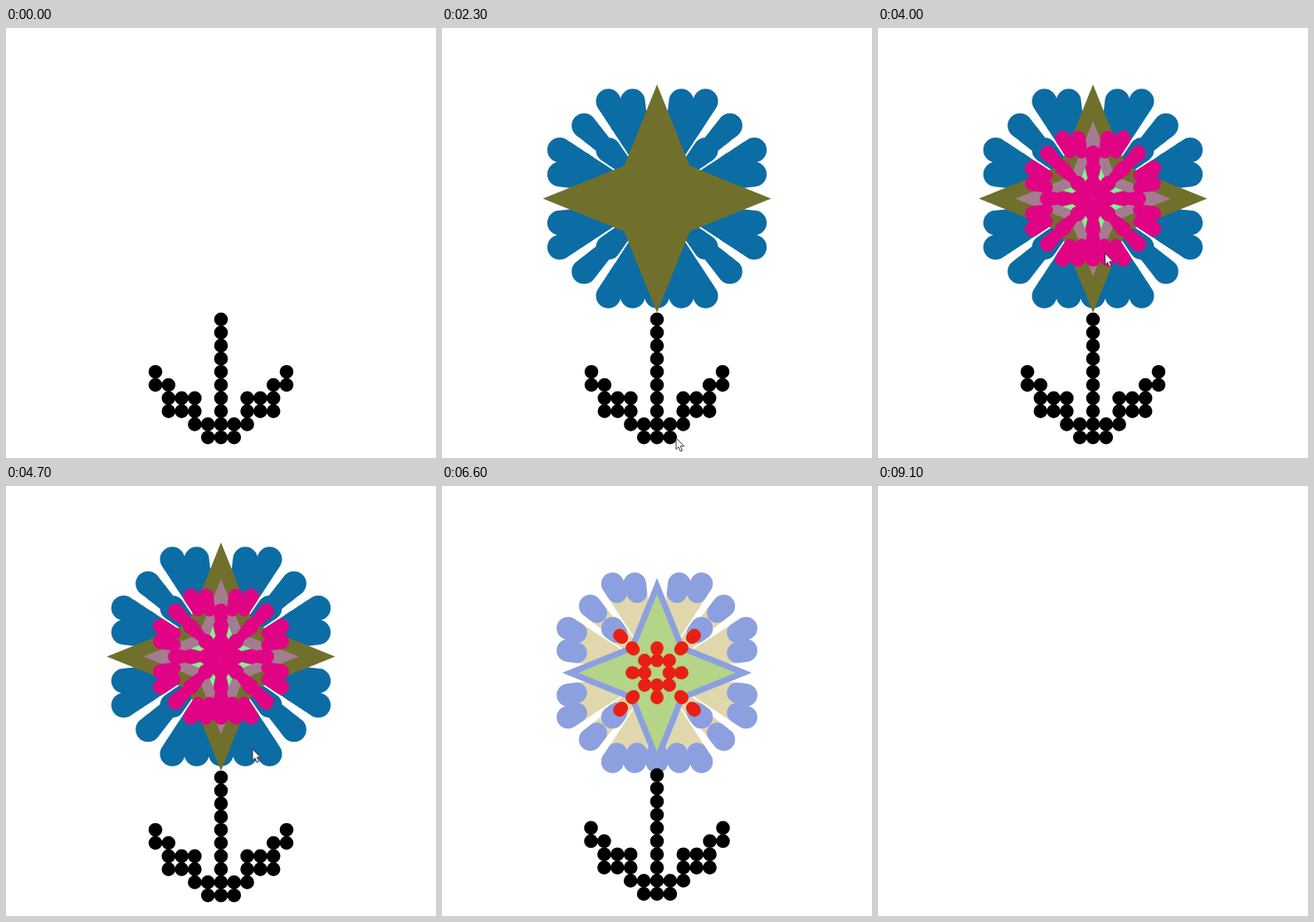
An HTML page with a canvas that plays this animation: 518x518 px, repeating every 9.5 s.

```html
<!DOCTYPE html>
<html lang="en">
<head>
<meta charset="utf-8">
<title>Dot flowers</title>
<style>
html, body { margin: 0; width: 100%; height: 100%; overflow: hidden; background: #fff; }
canvas { display: block; width: 518px; height: 518px; }
</style>
</head>
<body>
<canvas id="stage" width="518" height="518"></canvas>
<script>
const LOOP = 9500, TICK = 100;
const ctx = document.getElementById('stage').getContext('2d');

// All grid points whose distances from the two axes satisfy a rule.
function grid(rule) {
  const pts = [];
  for (let y = -4; y <= 4; y++)
    for (let x = -4; x <= 4; x++) {
      const a = Math.abs(x), b = Math.abs(y);
      if (rule(Math.min(a, b), Math.max(a, b))) pts.push([x, y]);
    }
  return pts;
}

const FOOT = [0, 4];
const isHeart = (lo, hi) => hi === 4 && (lo === 1 || lo === 2);
const isRay = (lo, hi, reach) =>
  (lo === hi && hi > 0 && hi < 4) || (lo === 0 && hi > 0 && hi <= reach);

const TIPS = [...grid(isHeart), FOOT];
const HEARTS = [...TIPS, ...grid((lo, hi) => lo === hi && (lo === 2 || lo === 3))];
const CROSS = grid((lo, hi) => isRay(lo, hi, 2));
const RAYS = grid((lo, hi) => isRay(lo, hi, 3));

function dot(x, y, r) {
  ctx.moveTo(x + r, y);
  ctx.arc(x, y, r, 0, Math.PI * 2);
}

// Stamp a dot pattern repeatedly while it shrinks from full size to `end`.
function petals([cx, cy], pts, pitch, color, end = 1, size = 0.51) {
  ctx.fillStyle = color;
  ctx.beginPath();
  for (let s = 1; s >= end - 1e-6; s -= 0.02) {
    const p = pitch * s;
    for (const [x, y] of pts) dot(cx + x * p, cy + y * p, p * size);
  }
  ctx.fill();
}

function star([cx, cy], radius, color) {
  ctx.fillStyle = color;
  ctx.beginPath();
  for (let i = 0; i < 8; i++) {
    const a = i * Math.PI / 4, r = i % 2 ? radius * 0.406 : radius;
    ctx.lineTo(cx + Math.cos(a) * r, cy + Math.sin(a) * r);
  }
  ctx.fill();
}

// A straight stalk with a diagonal leaf, thicker in its middle, on each side.
function stem(x, y, pitch) {
  ctx.fillStyle = '#000';
  ctx.beginPath();
  for (let row = 0; row < 10; row++)
    for (let col = -5; col <= 5; col++) {
      const c = Math.abs(col), sum = c + row;
      const edge = sum === 9 || sum === 10;
      const thick = c >= 2 && c <= 4 && (row === 6 || row === 7);
      if (c === 0 || (row >= 4 && edge) || thick)
        dot(x + col * pitch, y + row * pitch, 8.3);
    }
  ctx.fill();
}

function growing(t) {
  const c = [259, 205.5];
  stem(259, 351, 15.8);
  if (t < 1000) return;
  petals(c, HEARTS, 29.3, '#0c6ca4', 0.02);
  if (t >= 2000) star(c, 137.5, '#70702c');
  if (t >= 3000) star(c, 93.5, '#a47c90');
  if (t >= 3200) star(c, 60, '#80f490');
  if (t >= 4000) {
    petals(c, TIPS, 18.2, '#e00484', 0.76);
    petals(c, RAYS, 18.2, '#e00484', 0.02);
  }
  if (t >= 5200) petals(c, CROSS, 10.4, '#f4e40c', 1, 0.55);
  cursor(t);
}

function fringed(c, pitch, [edge, fan, inner, dots]) {
  const radius = pitch * 4.26;
  petals(c, HEARTS, pitch, fan, 0.02);
  petals(c, HEARTS, pitch, edge, 0.9);
  star(c, radius, edge);
  star(c, radius * 0.83, inner);
  petals(c, CROSS, 15, dots, 0.94, 0.53);
  stem(259, 348.3, 15.9);
}

function crossed() {
  const c = [260, 205.5];
  petals(c, HEARTS, 21.8, '#f4e40c', 0.02);
  star(c, 143.5, '#ec6c38');
  star(c, 107, '#0c3cd8');
  petals(c, CROSS, 30.7, '#483c48', 0.02, 0.52);
  petals(c, CROSS, 10.4, '#8c8818', 1, 0.57);
  stem(260, 350, 15.7);
}

// Pointer stops: time, x, y.
const PATH = [
  [1000, 262, 240], [2300, 282, 494], [3000, 280, 478], [3300, 250, 226],
  [4700, 297, 317], [5400, 264, 216], [6500, 290, 340]
];

function cursor(t) {
  const i = Math.max(1, PATH.findIndex(k => k[0] >= t));
  const [t0, x0, y0] = PATH[i - 1], [t1, x1, y1] = PATH[i];
  const u = (t - t0) / (t1 - t0), e = u * u * (3 - 2 * u);
  ctx.save();
  ctx.translate(x0 + (x1 - x0) * e, y0 + (y1 - y0) * e);
  const arrow = new Path2D('M0 0V13.5L3 10.7L5.2 16L7.5 15L5.3 9.8H9.5Z');
  ctx.fillStyle = '#fff';
  ctx.fill(arrow);
  ctx.strokeStyle = '#333';
  ctx.stroke(arrow);
  ctx.restore();
}

const SCENES = [
  [9100, () => {}],
  [8400, () => fringed([259, 224.5], 27, ['#e88cb0', '#f4dcc0', '#8cc8d8', '#6c3c94'])],
  [7800, crossed],
  [7100, () => fringed([260, 225], 27, ['#e0a04c', '#d4e0b8', '#d87c6c', '#2c64a8'])],
  [6500, () => fringed([259, 225], 26.8, ['#8ca0e0', '#e0d8ac', '#b4d488', '#e82014'])],
  [0, growing]
];

const start = performance.now();
let last = -1;

function frame(now) {
  const t = Math.floor((Math.max(0, now - start) % LOOP) / TICK) * TICK;
  if (t !== last) {
    last = t;
    ctx.fillStyle = '#fff';
    ctx.fillRect(0, 0, 518, 518);
    SCENES.find(s => t >= s[0])[1](t);
  }
  requestAnimationFrame(frame);
}
frame(start);
</script>
</body>
</html>
```
